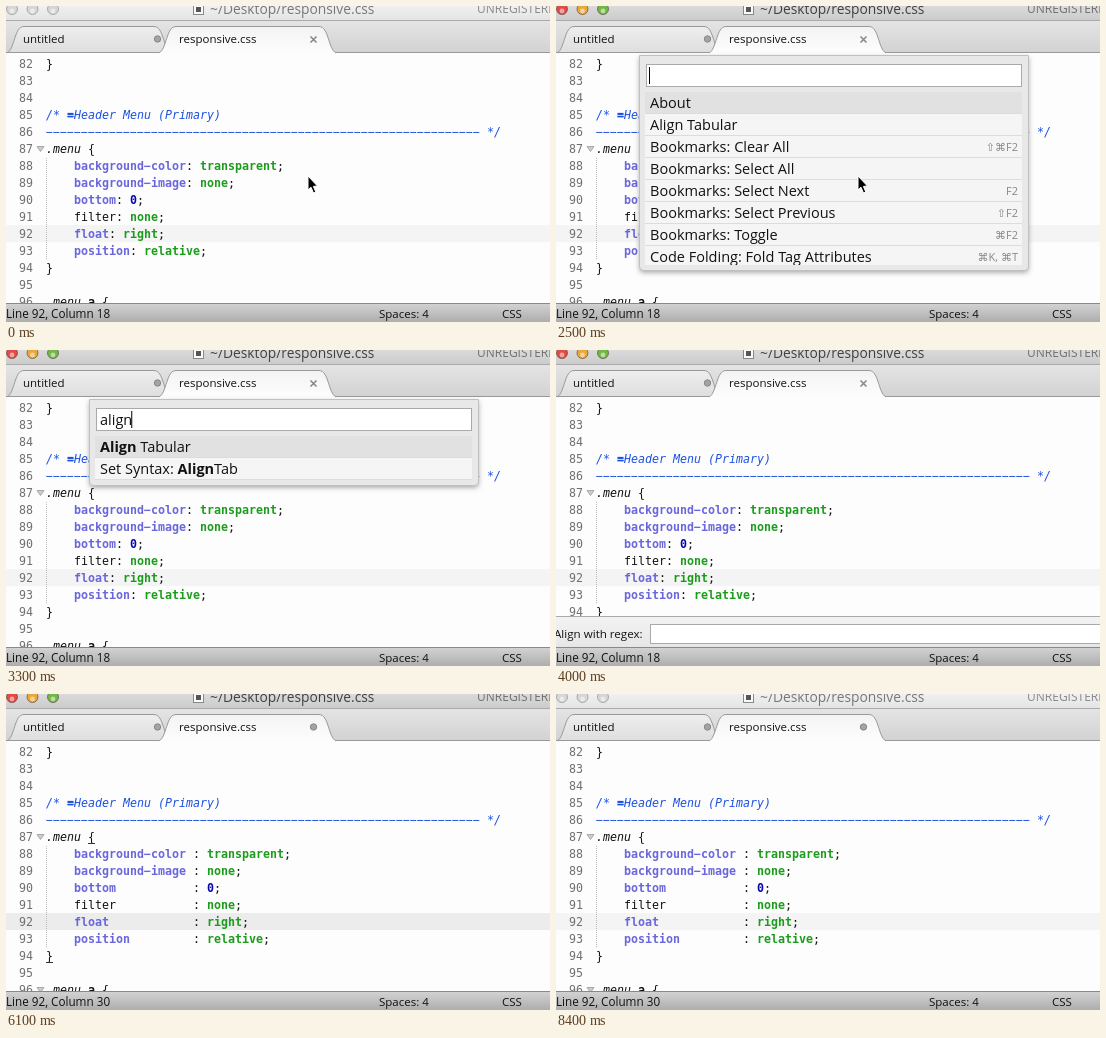
An HTML page with a canvas for the animation above (8500 ms loop, 544x316 px).

```html
<!DOCTYPE html>
<html lang="en">
<head>
<meta charset="utf-8">
<title>Aligning CSS</title>
<style>
html, body { margin: 0; width: 100%; height: 100%; overflow: hidden; background: #fdfdfd; }
canvas { display: block; width: 544px; height: 316px; }
</style>
</head>
<body>
<canvas id="stage" width="544" height="316"></canvas>
<script>
const c = document.getElementById('stage').getContext('2d', { alpha: false });
const LOOP = 8500, CHAR = 7, ROW = 17, LEFT = 40;
const UI = '"Open Sans", "Noto Sans", "DejaVu Sans", sans-serif';
const MONO = '11.63px "DejaVu Sans Mono", "Liberation Mono", monospace';

// Moments in ms
const ACTIVE = 200, PALETTE = 2200, ENTER = 3500, PANEL = 3600,
      COLON = 4600, ALIGN = 5300, BLUR = 8000;
const KEYS = [2700, 2820, 2940, 3060, 3180];

const rules = [
  ['background-color', 'transparent'], ['background-image', 'none'],
  ['bottom', '0'], ['filter', 'none'], ['float', 'right'], ['position', 'relative']
];
const commands = [
  ['About'], ['Align Tabular'], ['Bookmarks: Clear All', '⇧⌘F2'], ['Bookmarks: Select All'],
  ['Bookmarks: Select Next', 'F2'], ['Bookmarks: Select Previous', '⇧F2'],
  ['Bookmarks: Toggle', '⌘F2'], ['Code Folding: Fold Tag Attributes', '⌘K, ⌘T']
];
const matches = [['Align Tabular'], ['Set Syntax: AlignTab']];

const clamp = v => Math.max(0, Math.min(1, v));
const ease = v => 1 - (1 - clamp(v)) ** 2;

function rect(x, y, w, h, fill) {
  c.fillStyle = fill;
  c.fillRect(x, y, w, h);
}

function box(x, y, w, h, fill, stroke) {
  rect(x, y, w, h, fill);
  c.strokeStyle = stroke;
  c.strokeRect(x + 0.5, y + 0.5, w - 1, h - 1);
}

function fade(y0, y1, from, to) {
  const g = c.createLinearGradient(0, y0, 0, y1);
  g.addColorStop(0, from);
  g.addColorStop(1, to);
  return g;
}

function text(s, x, y, font, color = '#111', align = 'left') {
  c.font = font;
  c.fillStyle = color;
  c.textAlign = align;
  c.fillText(s, x, y);
}

const ui = (s, x, y, size, color, weight = 500, align) =>
  text(s, x, y, `${weight} ${size}px ${UI}`, color, align);

function dot(x, y, r, fill, stroke) {
  c.beginPath();
  c.arc(x, y, r, 0, 7);
  c.fillStyle = fill;
  c.fill();
  if (stroke) {
    c.strokeStyle = stroke;
    c.stroke();
  }
}

function poly(points, fill, stroke) {
  c.beginPath();
  points.forEach(([x, y]) => c.lineTo(x, y));
  c.closePath();
  c.fillStyle = fill;
  c.fill();
  c.strokeStyle = stroke;
  c.stroke();
}

function caret(x, y, h, t) {
  const a = clamp(0.5 + 1.6 * Math.cos((t - 1600) / 1000 * 2 * Math.PI));
  rect(x, y, 1, h, `rgba(0,0,0,${a})`);
}

const baseline = line => 62 + (line - 82) * ROW;

// Hyphens are drawn with the longer minus sign.
const code = (line, col, s, color = '#111', style = '') =>
  text(s.replace(/-/g, '−'), LEFT + col * CHAR, baseline(line), `${style} ${MONO}`, color);

function foldMark(line) {
  const y = baseline(line) - 4;
  poly([[31, y - 2.5], [38, y - 2.5], [34.5, y + 2.5]], '#ccc', '#aaa');
}

function drawEditor(t, focus, aligned) {
  rect(0, 47, 544, 252, '#fdfdfd');
  rect(0, 219, 544, 17, focus ? '#ebeceb' : '#f3f4f3');
  for (let n = 82; n <= 96; n++) text(n, 27, baseline(n), MONO, '#707070', 'right');
  for (let y = 152; y < 253; y += 2) rect(LEFT, y, 1, 1, '#bbb');

  code(82, 0, '}');
  code(85, 0, '/* =Header Menu (Primary)', '#1c50e0', 'italic');
  code(85, 3, '=', '#1c50e0', 'bold italic');
  code(86, 0, '-'.repeat(62) + ' */', '#1c50e0', 'italic');
  code(87, 0, '.menu', '#111', 'italic');
  code(87, 6, '{');
  rules.forEach(([name, value], i) => {
    const line = 88 + i, end = 4 + (aligned ? 17 : name.length);
    const plain = name === 'filter';
    code(line, 4, name, plain ? '#111' : '#6a66dc', plain ? '' : 'bold');
    code(line, end, ':');
    code(line, end + 2, value, value === '0' ? '#0808b0' : '#1c9c1c', 'bold');
    code(line, end + 2 + value.length, ';');
  });
  code(94, 0, '}');
  code(96, 0, '.menu', '#111', 'italic');
  code(96, 6, 'a', '#111', 'bold');
  code(96, 8, '{');
  foldMark(87);
  if (aligned) foldMark(96);
  if (focus) {
    rect(82, 149, 7, 1, '#333');
    rect(40, 268, 7, 1, '#333');
    caret(LEFT + (aligned ? 29 : 17) * CHAR - 1, 220, 15, t);
  }
}

function tab(x0, x1, fill) {
  c.beginPath();
  c.moveTo(x0, 47);
  c.bezierCurveTo(x0 + 8, 43, x0 + 7, 20.5, x0 + 17, 20.5);
  c.lineTo(x1 - 17, 20.5);
  c.bezierCurveTo(x1 - 7, 20.5, x1 - 8, 43, x1, 47);
  c.fillStyle = fill;
  c.fill();
  c.strokeStyle = '#999';
  c.stroke();
}

const changeDot = x => dot(x, 33, 3.2, '#a4a4a4', '#868686');

function drawChrome(active, changed) {
  rect(0, 0, 544, 14, active ? fade(0, 14, '#dadada', '#cccccc') : fade(0, 14, '#f0f0f0', '#e4e4e4'));
  rect(0, 14, 544, 1, '#aaa');
  rect(0, 15, 544, 32, fade(15, 47, '#e4e4e4', '#d2d2d2'));
  const lights = active ? ['#e34b45', '#eba739', '#72b845'] : ['#d6d6d6', '#d6d6d6', '#d6d6d6'];
  lights.forEach((color, i) => {
    const x = 6 + 20.5 * i;
    dot(x, 3, 5.5, color, active ? 'rgba(70,50,40,.55)' : '#aaa');
    dot(x, 5, 2.4, 'rgba(255,255,255,.5)');
  });
  box(187, -3, 11, 12, '#fafafa', '#888');
  rect(190, 1, 5, 5, '#555');
  ui('~/Desktop/responsive.css', 204, 8, 13.8, active ? '#404040' : '#777', 400);
  ui('UNREGISTERED', 471, 7, 12, active ? '#707070' : '#888', 400);

  tab(1, 165, fade(20, 47, '#eeeeee', '#dedede'));
  rect(0, 46, 544, 1, '#999');
  tab(153, 330, fade(20, 47, '#f3f3f3', '#fdfdfd'));
  rect(155, 46, 173, 2, '#fdfdfd');
  ui('untitled', 17, 37, 11.5);
  ui('responsive.css', 173, 37, 11.5);
  changeDot(151.5);
  if (changed) changeDot(307.5);
  else {
    c.strokeStyle = '#888';
    c.lineWidth = 1.6;
    c.beginPath();
    c.moveTo(304.5, 30.5); c.lineTo(310.5, 36.5);
    c.moveTo(310.5, 30.5); c.lineTo(304.5, 36.5);
    c.stroke();
    c.lineWidth = 1;
  }
}

function drawStatus(column) {
  rect(0, 298, 544, 18, fade(298, 316, '#d2d2d2', '#adadad'));
  rect(0, 297, 544, 1, '#888');
  ui('Line 92, Column ' + column, 0, 312, 11.7);
  ui('Spaces: 4', 373, 312, 11.5);
  ui('CSS', 496, 312, 11.5);
}

// Writes a label with the typed letters in bold, in order.
function label(s, query, x, y) {
  const start = query.length > 2 ? s.toLowerCase().indexOf(query) : 0;
  let k = 0, run = '', bold = false;
  const flush = () => {
    ui(run, x, y, 14.5, '#111', bold ? 700 : 500);
    x += c.measureText(run).width;
    run = '';
  };
  [...s].forEach((ch, i) => {
    const hit = i >= start && k < query.length && ch.toLowerCase() === query[k];
    if (hit) k++;
    if (hit !== bold) {
      flush();
      bold = hit;
    }
    run += ch;
  });
  flush();
}

function drawPalette(t) {
  const query = 'align'.slice(0, KEYS.filter(k => t >= k).length);
  const items = query.length > 2 ? matches : query === 'al' ? commands.slice(1) : commands;
  const bottom = Math.min(259, 86 + items.length * 22);
  c.save();
  c.shadowColor = 'rgba(0,0,0,.35)';
  c.shadowBlur = 5;
  c.shadowOffsetY = 2;
  c.beginPath();
  c.roundRect(83.5, 49.5, 389, bottom - 44, [0, 0, 4, 4]);
  c.fillStyle = '#e8e8e8';
  c.fill();
  c.restore();
  c.strokeStyle = '#c0c0c0';
  c.stroke();

  box(90, 58, 376, 23, '#fff', '#aaa');
  ui(query, 94, 75, 14.5);
  caret(93 + c.measureText(query).width, 61, 17, query ? 1600 : t);

  c.save();
  c.beginPath();
  c.rect(89, 86, 377, bottom - 86);
  c.clip();
  items.forEach(([name, keys], i) => {
    const y = 86 + i * 22;
    rect(89, y, 377, 22, i ? '#f4f5f4' : '#e0e1e0');
    rect(89, y + 21, 377, 1, '#dcdcdc');
    label(name, query, 94, y + 16);
    if (keys) ui(keys, 462, y + 15, 11, '#888', 400, 'right');
  });
  c.restore();
}

function drawPanel(t) {
  const shown = ease((t - PANEL) / 200) * (1 - ease((t - ALIGN) / 200));
  if (!shown) return;
  const y = 298 - 32 * shown;
  rect(0, y, 544, 32, fade(y, y + 32, '#f3f3f3', '#e6e6e6'));
  rect(0, y, 544, 1, '#aaa');
  ui('Align with regex:', -2, y + 22, 11.6);
  box(94, y + 8, 460, 20, '#fff', '#aaa');
  if (t >= COLON) text(':', 98, y + 22, MONO);
  caret(t >= COLON ? 105 : 98, y + 10, 15, t);
}

function drawPointer() {
  poly([[302, 170], [302, 184], [305, 181.2], [307.5, 187], [309.8, 186], [307.4, 180.4], [311.4, 180]],
    '#000', '#fff');
}

function draw(t) {
  const active = t >= ACTIVE && t < BLUR, aligned = t >= ALIGN;
  const palette = t >= PALETTE && t < ENTER;
  const focus = active && (t < PALETTE || aligned);
  drawEditor(t, focus, aligned);
  drawChrome(active, aligned);
  if (palette) drawPalette(t);
  drawPanel(t);
  drawStatus(aligned ? 30 : 18);
  if (t < KEYS[0]) drawPointer();
}

const begin = performance.now();
function frame() {
  draw((performance.now() - begin) % LOOP);
  requestAnimationFrame(frame);
}
frame();
</script>
</body>
</html>
```
